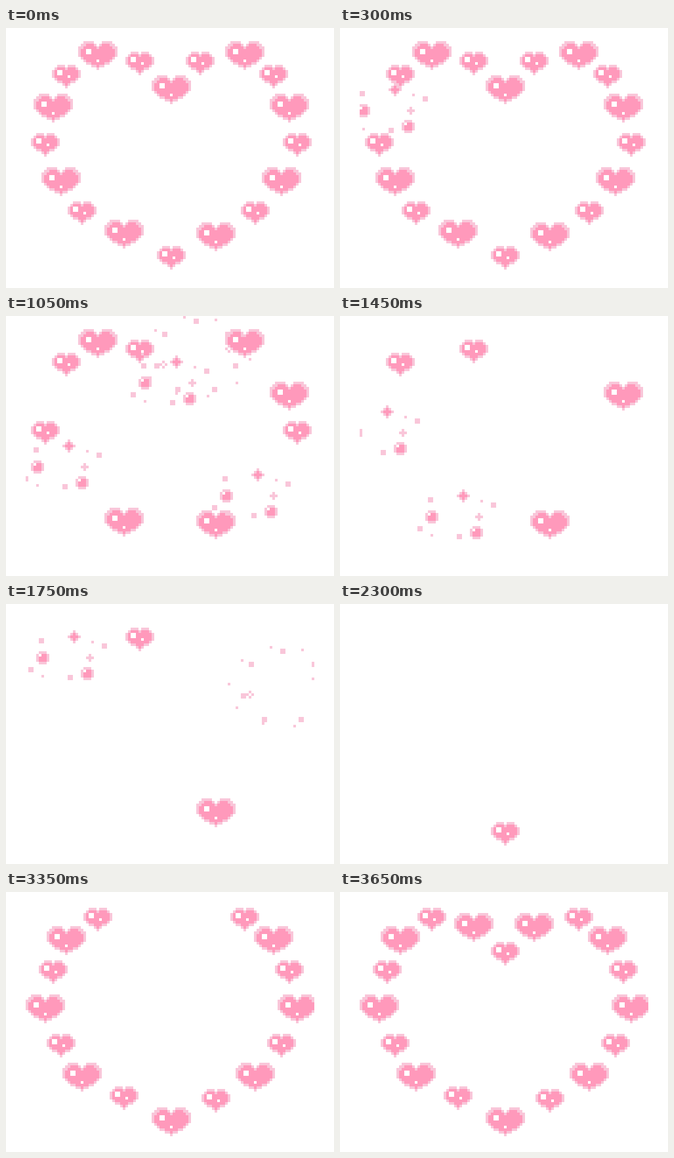
Animation of 500x396 px, one loop 3850 ms. Source, as an HTML page with a canvas:

```html
<!DOCTYPE html>
<html lang="en">
<head>
<meta charset="utf-8">
<title>Heart ring</title>
<style>
  html, body { margin: 0; width: 100%; height: 100%; overflow: hidden; background: #fff; }
  canvas { display: block; }
</style>
</head>
<body>
<canvas id="stage" width="500" height="396"></canvas>
<script>
const ctx = document.getElementById('stage').getContext('2d');
const CELL = 4, LOOP = 3850;
const COLORS = { o: '#f9c6d9', x: '#ff99bb', w: '#ffffff' };

const SPRITES = {
  small: ['..ooo.ooo..', '.oxxxoxxxo.', 'oxwwxxxxxxo', 'oxwwxxxxxxo', 'oxxxxxwxxxo',
          '.oxxxxxxxo.', '..ooxxxoo..', '....oxo....', '.....o.....'],
  big: ['..oooo...oooo..', '.ooxxxo.oxxxoo.', 'ooxxxxxoxxxxxoo', 'oxxwwxxxxxxxxxo',
        'oxxwwxxxxxxxxxo', 'oxxxxxxxxxxxxxo', '.oxxxxxxxxxxxo.', '..oxxxxwxxxxo..',
        '...ooxxxxxoo...', '.....ooxoo.....', '.......o.......'],
  star: ['..o..', '.oxo.', 'oxxxo', '.oxo.', '..o..'],
  ball: ['.ooo.', 'owxxo', 'oxxxo', 'oxxxo', '.ooo.'],
  plus: ['.o.', 'ooo', '.o.'],
  ring: ['.o.', 'o.o', '.o.'],
  square: ['oo', 'oo'],
  dot: ['o']
};

const snap = v => Math.round(v / CELL) * CELL;
const every = (from, gap, count) => Array.from({ length: count }, (_, i) => from + i * gap);

// Evenly spread points on an ellipse around the middle of a burst.
const around = (count, rx, ry, turn) => every(turn, 360 / count, count).map(deg => {
  const angle = deg * Math.PI / 180;
  return [-10 + rx * Math.cos(angle), 32 + ry * Math.sin(angle)];
});

// A burst first throws a few sparkles, then thins out into a wider cloud.
const BURST = [
  { star: [[0, 0]], ball: [[-48, 32], [20, 56]], plus: [[24, 32]],
    square: [[46, 14], [-50, 6], [-66, 50], [-6, 62]], dot: [[28, 8], [-48, 60]] },
  { ring: around(2, 50, 50, -12), square: around(7, 62, 56, 13), dot: around(10, 82, 60, 4) }
];

// The ring clockwise from its lowest heart: centre, and the step in which it bursts.
const RING = [
  [252, 348, 6], [180, 312, 12], [116, 280, 5], [84, 232, 8], [60, 176, 12], [72, 120, 2],
  [92, 72, 15], [140, 40, 9], [204, 52, 16], [252, 92, 8], [296, 52, 7], [364, 40, 10],
  [408, 72, 3], [432, 120, 14], [444, 176, 9], [420, 232, 4], [380, 280, 8], [320, 316, 16]
];
const HEARTS = RING.map(([x, y, pop], i) => ({ x, y, pop, rank: Math.min(i, RING.length - i) }));

const STEPS = [...every(0, 150, 5), 700, ...every(850, 100, 13), ...every(2300, 150, 10)];
const CALM = 4, EMPTY = 18, GROW = 19;

function drawSprite(name, x, y) {
  const rows = SPRITES[name];
  const left = snap(x - rows[0].length * CELL / 2 - 2) + 2;
  const top = snap(y - rows.length * CELL / 2);
  rows.forEach((row, j) => [...row].forEach((key, i) => {
    if (key === '.') return;
    ctx.fillStyle = COLORS[key];
    ctx.fillRect(left + i * CELL, top + j * CELL, CELL, CELL);
  }));
}

function drawHeart({ x, y, rank }, beat) {
  drawSprite((beat + rank) % 2 ? 'big' : 'small', x, y);
}

// Bursts sit above their heart and lean towards the middle of the ring.
function drawBurst({ x, y }, phase) {
  const burstX = snap(x - x / 30 + 15);
  const burstY = snap(y - y / 15 - 19.6) + 2;
  for (const [name, places] of Object.entries(BURST[phase] || {}))
    for (const [dx, dy] of places) drawSprite(name, burstX + dx, burstY + dy);
}

function drawStep(step) {
  ctx.fillStyle = '#fff';
  ctx.fillRect(0, 0, 500, 396);
  ctx.save();
  ctx.beginPath();
  ctx.rect(30, 0, 440, 388);
  ctx.clip();
  if (step >= GROW) {
    const beat = step - GROW;
    HEARTS.filter(h => h.rank <= beat).forEach(h => drawHeart(h, beat));
  } else if (step < EMPTY) {
    const beat = step < CALM ? step : 0;
    HEARTS.filter(h => step < h.pop).forEach(h => drawHeart(h, beat));
    HEARTS.forEach(h => drawBurst(h, step - h.pop));
  }
  ctx.restore();
}

let shown = -1;
const start = performance.now();
function tick() {
  const time = (performance.now() - start) % LOOP;
  const step = STEPS.filter(t => t <= time).length - 1;
  if (step !== shown) drawStep(shown = step);
  requestAnimationFrame(tick);
}
tick();
</script>
</body>
</html>
```
